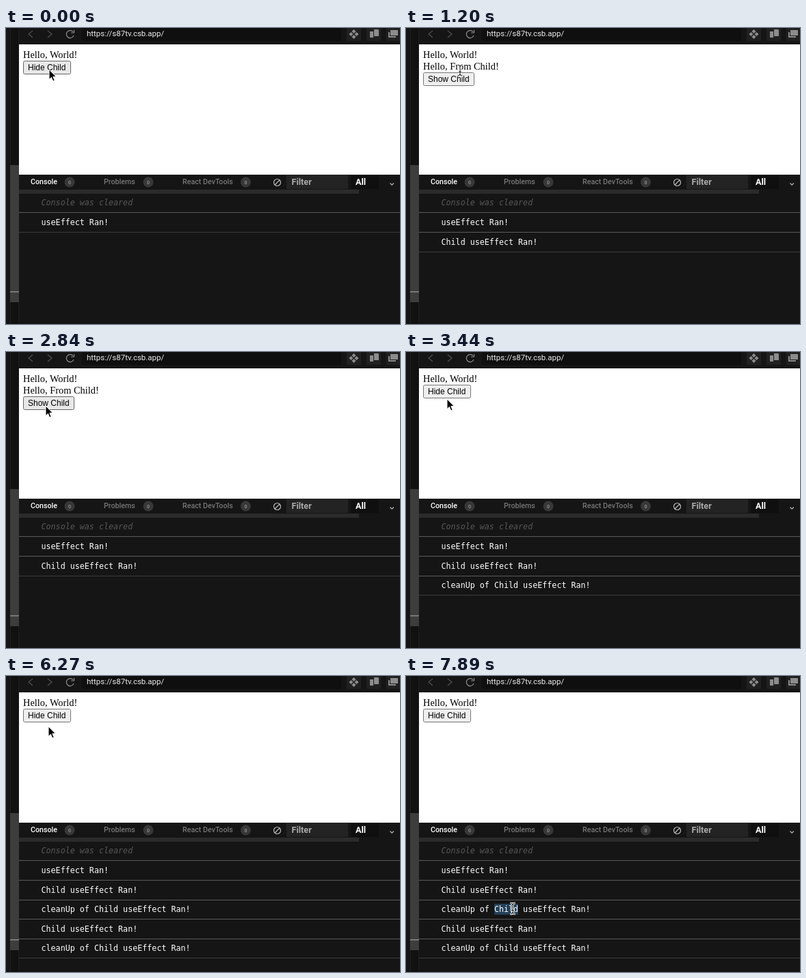
Animation, 576 px wide and 434 px high, one loop 8 s. Source, as an HTML page:

```html
<!DOCTYPE html>
<html lang="en">
<head>
<meta charset="utf-8">
<style>
  html, body { margin: 0; width: 100%; height: 100%; overflow: hidden; background: #151515; }
  svg { display: block; width: 576px; height: 434px; }
  .serif { font: 14.4px "Liberation Serif", serif; }
  .button { font: 12px "Liberation Sans", sans-serif; }
  .ui { font: 500 10.7px Roboto, sans-serif; fill: #777; }
  .url { font: 11.5px Roboto, sans-serif; fill: #eee; }
  .field { font: 700 12.6px Roboto, sans-serif; fill: #aaa; }
  .badge { font: 500 7px Roboto, sans-serif; fill: #999; text-anchor: middle; }
  .mono { font: 11.7px "DejaVu Sans Mono", monospace; fill: #fff; }
  .line { fill: none; stroke-width: 1.2; }
</style>
</head>
<body>
<svg viewBox="0 0 576 434">
  <rect width="576" height="434" fill="#151515"/>

  <!-- editor edge -->
  <rect x="6" width="13" height="434" fill="#111"/>
  <path d="M6.5 0V434M18.5 0V434" stroke="#1d1d1d"/>
  <rect x="6" y="201" width="13" height="201" fill="#3d3d3d"/>
  <rect x="6" y="386" width="13" height="1.5" fill="#8a8a8a"/>

  <!-- address bar -->
  <rect x="111" width="379" height="19" fill="#0f0f0f"/>
  <path class="line" d="M39 4L33 9L39 14M61 4L67 9L61 14" stroke="#505050"/>
  <path class="line" d="M98 5.5A5.5 5.5 0 1 0 99 11M99.500 3V7H95" stroke="#8c8c8c"/>
  <text class="url" x="118" y="12">https://s87tv.csb.app/</text>
  <g fill="#202020">
    <rect x="498" width="21" height="19"/><rect x="527" width="21" height="19"/><rect x="556" width="20" height="19"/>
  </g>
  <g fill="#8c8c8c">
    <path d="M508.500 2l3 3-3 3-3-3zM508.500 10l3 3-3 3-3-3zM504.500 6l3 3-3 3-3-3zM512.500 6l3 3-3 3-3-3z"/>
    <path d="M532 5h5v9h-5zM538 2h6l1 1v9h-7z"/>
    <path d="M562 3h11v8h-11zM559 6h2v6h9v2h-11z"/>
  </g>

  <!-- page -->
  <rect x="19" y="24" width="557" height="191" fill="#fff"/>
  <text class="serif" x="25" y="44">Hello, World!</text>
  <text class="serif" x="25" y="61" id="child">Hello, From Child!</text>
  <g id="button">
    <rect x="25.5" y="48.5" height="19" rx="2" id="face"/>
    <text class="button" x="32" y="62" id="label"></text>
  </g>

  <!-- console tabs -->
  <rect x="19" y="215" width="557" height="1" fill="#262626"/>
  <rect x="410" y="216" width="90" height="20" fill="#232323"/>
  <rect x="504" y="216" width="41" height="20" fill="#0f0f0f"/>
  <g id="tabs"></g>
  <g class="line" stroke="#bbb">
    <circle cx="396.500" cy="226.500" r="5"/><path d="M393 230L400 223"/>
    <path d="M561.500 227.500l2.700 2.700 2.700-2.700"/>
  </g>
  <text class="field" x="417.500" y="230">Filter</text>
  <text class="field" x="511" y="230" style="fill:#fff">All</text>
  <rect x="19" y="237" width="497" height="6" fill="#2b2b2b"/>

  <!-- console log -->
  <rect id="selection" x="129" y="334" width="35" height="16" fill="#234059"/>
  <text class="mono" x="51.500" y="260" style="fill:#595959;font-style:italic">Console was cleared</text>
  <rect x="19" y="270" width="557" height="1" fill="#5a5a5a"/>
  <g id="log"></g>

  <path id="arrow" d="M0 0V14.500L3.400 11.400L5.800 17L8.200 16L5.800 10.500H10.300Z" fill="#000" stroke="#fff"/>
  <g id="beam" fill="none">
    <path id="stem" d="M-3.500-8Q0-8 0-5.500Q0-8 3.500-8M0-6V6M-3.500 8Q0 8 0 5.500Q0 8 3.500 8M-2 2.500H2" stroke="#fff" stroke-width="2.600"/>
    <use href="#stem" style="stroke:#000"/>
    <path d="M-3.500-8Q0-8 0-5.500Q0-8 3.500-8M0-6V6M-3.500 8Q0 8 0 5.500Q0 8 3.500 8M-2 2.500H2" stroke="#111"/>
  </g>
</svg>
<script>
const LOOP = 8000, TICK = 148.8;
const CLICKS = [7, 20, 31, 42];
const SELECT = 53;
// Pointer path: tick, x, y
const PATH = [
  [0, 63, 61], [1, 88, 82], [2, 136, 117], [3, 104, 86], [4, 73, 62], [7, 73, 62], [8, 79, 62],
  [11, 108, 90], [14, 96, 98], [19, 58, 79], [21, 58, 79], [23, 60, 69], [27, 62, 61], [30, 62, 61],
  [31, 63, 61], [35, 63, 61], [37, 62, 74], [44, 62, 74], [46, 120, 180], [48, 246, 368], [51, 156, 341]
];
const $ = id => document.getElementById(id);
const show = (node, on) => node.style.display = on ? '' : 'none';

$('tabs').innerHTML = [['Console', 36, 93, '#fff'], ['Problems', 143, 208, '#777'], ['React DevTools', 258, 350.5, '#777']]
  .map(([name, x, cx, color]) => `<text class="ui" x="${x}" y="229" style="fill:${color}">${name}</text>
    <circle cx="${cx}" cy="226" r="7.5" fill="#383838"/><text class="badge" x="${cx}" y="228.5">0</text>`).join('');

const child = 'Child useEffect Ran!', cleanUp = 'cleanUp of ' + child;
$('log').innerHTML = ['useEffect Ran!', child, cleanUp, child, cleanUp].map((text, i) => {
  const y = Math.round(28.6 * i);
  return `<g><text class="mono" x="51.5" y="${289 + y}">${text}</text>
    <rect x="19" y="${299 + y}" width="557" height="1"/></g>`;
}).join('');
const rows = [...$('log').children];

function pointer(tick) {
  const next = PATH.findIndex(p => p[0] > tick);
  if (next < 0) return PATH.at(-1).slice(1);
  const [t0, x0, y0] = PATH[next - 1], [t1, x1, y1] = PATH[next];
  const k = (tick - t0) / (t1 - t0);
  return [x0 + (x1 - x0) * k, y0 + (y1 - y0) * k];
}

function draw(now) {
  const tick = Math.floor(now % LOOP / TICK);
  const clicks = CLICKS.filter(c => tick >= c).length;
  const open = clicks % 2 === 1;
  const [x, y] = pointer(tick);

  const shift = open ? 17 : 0, width = open ? 74 : 69;
  const hover = x > 25 && x < 26 + width && y > 48 + shift && y < 68 + shift;
  show($('child'), open);
  $('button').setAttribute('transform', `translate(0 ${shift})`);
  $('face').setAttribute('width', width);
  $('face').setAttribute('fill', hover ? '#e8e8e8' : '#efefef');
  $('face').setAttribute('stroke', hover ? '#666' : '#767676');
  $('label').textContent = open ? 'Show Child' : 'Hide Child';

  rows.forEach((row, i) => {
    show(row, i <= clicks);
    row.lastElementChild.setAttribute('fill', i < clicks ? '#5a5a5a' : '#3c3c3c');
  });
  show($('selection'), tick >= SELECT);

  const overText = y > 243 || open && x < 136 && y > 48 && y < 65;
  show($('arrow'), !overText);
  show($('beam'), overText);
  $(overText ? 'beam' : 'arrow').setAttribute('transform', `translate(${x} ${y})`);
}

const start = performance.now();
(function frame() {
  draw(performance.now() - start);
  requestAnimationFrame(frame);
})();
</script>
</body>
</html>
```
